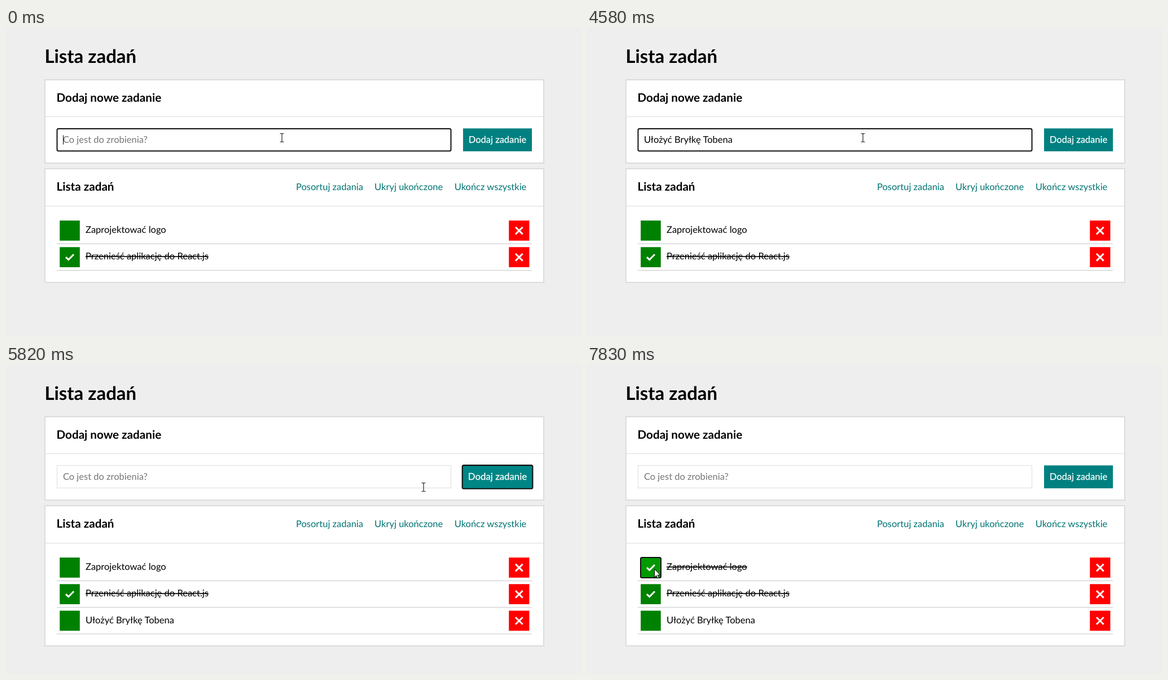
Animation, 1019 px wide and 549 px high, one loop 8000 ms. Source, as an HTML page:

```html
<!DOCTYPE html>
<html lang="pl">
<head>
<meta charset="utf-8">
<title>Lista zadań</title>
<style>
  html, body { margin: 0; width: 100%; height: 100%; overflow: hidden; background: #eee; }
  svg { display: block; width: 1019px; height: 549px; font: 16.5px Lato, sans-serif; }
  text { white-space: pre; text-rendering: geometricPrecision; }
  .head { font-size: 20.65px; font-weight: 700; }
  .card { fill: #fff; stroke: #dcdcdc; stroke-width: 2; }
  .line { fill: none; stroke: #ddd; }
  .link { fill: #007373; text-anchor: middle; }
  .ring { fill: none; stroke: #101010; stroke-width: 2; }
  .icon { fill: none; stroke: #fff; stroke-width: 3; }
  .done text { text-decoration: line-through 1px; }
  .check { display: none; }
  .done .check { display: inline; }
</style>
</head>
<body>
<svg viewBox="0 0 1019 549">
  <text x="68.4" y="61.7" font-size="32.95" font-weight="700">Lista zadań</text>

  <rect class="card" x="69" y="92" width="884" height="148"/>
  <path class="line" d="M70 157.5H952"/>
  <text class="head" x="89.5" y="131">Dodaj nowe zadanie</text>
  <rect class="line" x="90.5" y="178.5" width="698" height="40"/>
  <rect class="ring" id="fieldRing" x="90.5" y="179" width="698" height="39.5" rx="2.5"/>
  <text id="entry" x="100.9" y="203.7"></text>
  <path id="caret" d="M0 190.5V207" stroke="#000"/>
  <g id="add">
    <rect id="addBox" x="810" y="178.4" width="122" height="40.7"/>
    <text x="871" y="203.7" fill="#fff" stroke="#fff" stroke-width=".25" text-anchor="middle">Dodaj zadanie</text>
    <rect class="ring" id="addRing" x="809.8" y="178.5" width="122.4" height="40.8" rx="2.5"/>
  </g>

  <rect class="card" id="listCard" x="69" y="250" width="884"/>
  <path class="line" d="M70 316.5H952"/>
  <text class="head" x="89.5" y="288.7">Lista zadań</text>
  <text class="link" x="573.5" y="287.6">Posortuj zadania</text>
  <text class="link" x="713.7" y="287.6">Ukryj ukończone</text>
  <text class="link" x="858.5" y="287.6">Ukończ wszystkie</text>
  <g id="rows"></g>
  <rect class="ring" id="checkRing" x="95" y="342" width="36" height="36" rx="2.5"/>

  <circle id="click" cx="-1" cy="-1" r="11" fill="#98da32" fill-opacity=".78"/>
  <path id="arrow" d="M.5 .5V15L3.8 11.9L6 17L8.4 16L6.2 11H10.8Z" fill="#fff" stroke="#000"/>
  <path id="beam" d="M-3.5 -7.5H-1L0 -6.5L1 -7.5H3.5M0 -6.5V6.5M-3.5 7.5H-1L0 6.5L1 7.5H3.5" fill="none" stroke="#222" stroke-width="1.2"/>
</svg>
<script>
const $ = id => document.getElementById(id);
const set = (id, attrs) => { for (const k in attrs) $(id).setAttribute(k, attrs[k]); };
const show = (id, on) => { $(id).style.display = on ? '' : 'none'; };

const LOOP = 8000;
const TASK = 'Ułożyć Bryłkę Tobena';
const KEYS = [1250, 1480, 1630, 1860, 1940, 2170, 2320, 2490, 2565, 2640,
              2790, 2870, 3020, 3190, 3420, 3570, 3650, 3730, 3960, 4030];
const ADD_DOWN = 5130, ADDED = 5280, CHECK_DOWN = 7370, CHECKED = 7520;

// start, last step, step count, target x and y
const MOVES = [
  [4740, 5050, 5, 857, 191],
  [5600, 6370, 11, 217, 331],
  [6450, 6680, 4, 119, 362],
];

$('rows').innerHTML = ['Zaprojektować logo', 'Przenieść aplikację do React.js', TASK]
  .map((name, i) => `<g id="row${i}" transform="translate(0 ${i * 47.2})">
    <rect id="box${i}" x="95.2" y="342.1" width="35.6" height="35.7" fill="#008000"/>
    <path class="icon check" d="M106 360L110.7 364.5L120 355"/>
    <text x="141" y="364.2">${name}</text>
    <rect x="891.2" y="342.1" width="36.2" height="35.7" fill="#f00"/>
    <path class="icon" d="M903 353.8L915.6 366.4M915.6 353.8L903 366.4"/>
    <path d="M90 383.4H932" stroke="#c6c6c6"/></g>`).join('');
$('row1').classList.add('done');

const ramp = (t, a, b) => Math.min(1, Math.max(0, (t - a) / (b - a)));
const smooth = u => u * u * (3 - 2 * u);
const within = (t, a, b) => t >= a && t < b;

function pointer(t) {
  let x = 489, y = 195;
  for (const [start, end, steps, toX, toY] of MOVES) {
    if (t < start) break;
    const step = Math.floor((t - start) / (end - start) * (steps - 1) + 1.001);
    const u = smooth(Math.min(1, step / steps));
    x += (toX - x) * u;
    y += (toY - y) * u;
  }
  return [x, y];
}

function draw(t) {
  const typed = KEYS.filter(k => k <= t).length;
  const added = t >= ADDED;
  const empty = added || !typed;
  const entry = $('entry');
  entry.textContent = empty ? 'Co jest do zrobienia?' : TASK.slice(0, typed);
  entry.setAttribute('fill', empty ? '#757575' : '#000');
  const caretX = 101.5 + (empty ? 0 : entry.getComputedTextLength());
  set('caret', { transform: `translate(${Math.floor(caretX) + .5} 0)` });
  show('caret', t < 380 || within(t, 930, 4580));
  show('fieldRing', t < ADD_DOWN);

  const hover = ramp(t, 4940, 5130) - ramp(t, 5650, 5860);
  set('add', { transform: `translate(871 198.8) scale(${1 + .1 * hover}) translate(-871 -198.8)` });
  const tone = 128 + 25 * hover;
  set('addBox', { fill: `rgb(0 ${tone} ${tone})` });
  show('addRing', within(t, ADD_DOWN, CHECK_DOWN));

  show('row2', added);
  set('listCard', { height: added ? 249 : 202 });
  $('row0').classList.toggle('done', t >= CHECKED);
  set('box0', { fill: `rgb(0 ${128 + 25 * ramp(t, CHECK_DOWN, 7680)} 0)` });
  show('checkRing', t >= CHECK_DOWN);

  const [x, y] = pointer(t);
  const overField = x < 789 && y > 178 && y < 219;
  const place = { transform: `translate(${Math.round(x)} ${Math.round(y)})` };
  for (const id of ['click', 'arrow', 'beam']) set(id, place);
  show('beam', overField);
  show('arrow', !overField);
  show('click', within(t, ADD_DOWN, ADDED) || within(t, CHECK_DOWN, CHECKED));
}

const begin = performance.now();
function frame() {
  draw((performance.now() - begin) % LOOP);
  requestAnimationFrame(frame);
}
frame();
</script>
</body>
</html>
```
